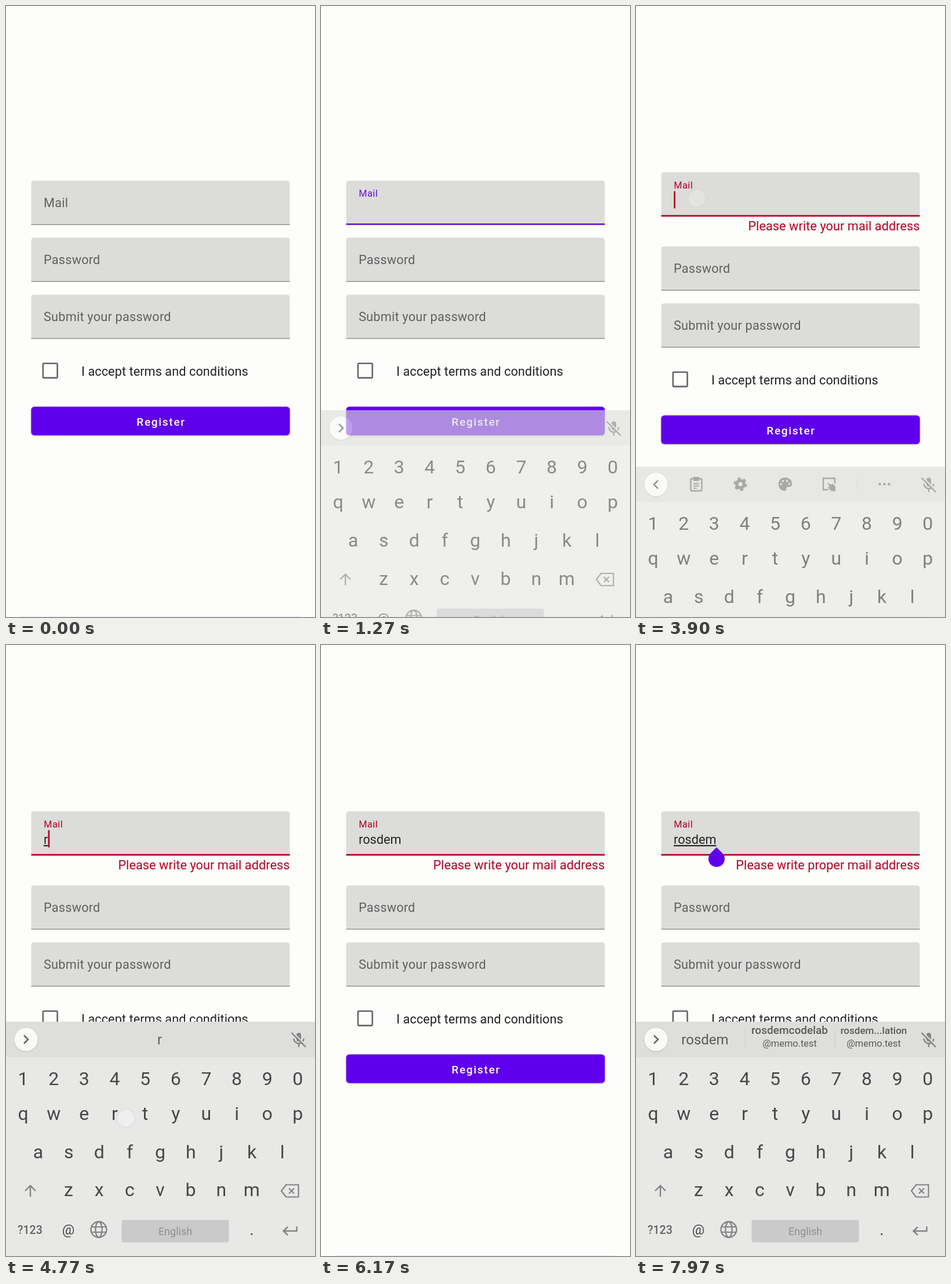
An HTML page for the animation above (8000 ms loop, 533 px wide and 1051 px high).

```html
<!DOCTYPE html>
<html lang="en">
<head>
<meta charset="utf-8">
<title>Register form</title>
<style>
  html, body { margin: 0; height: 100%; overflow: hidden; background: #fdfdfb; }
  svg { display: block; width: 100vw; height: 100vh; font-family: Roboto, sans-serif; }
</style>
</head>
<body>
<svg id="stage" viewBox="0 0 533 1051" preserveAspectRatio="none"></svg>
<script>
const LOOP = 8000;
const NAME = 'rosdem';
const PURPLE = '#5f00ec', ACCENT = '#6614d8', RED = '#b20022';
const PAGE = '#fdfdfb', FIELD = '#dcdcda', BAR = '#dededc', BOARD = '#e8e8e7';
const stage = document.getElementById('stage');

// Timing helpers
const ramp = (t, a, b) => Math.min(1, Math.max(0, (t - a) / (b - a)));
const ease = (t, a, b) => { const k = ramp(t, a, b); return k * k * (3 - 2 * k); };
const lerp = (a, b, k) => a + (b - a) * k;
const within = (t, spans) => spans.some(([a, b]) => t >= a && t < b);
const mix = (a, b, k) => `color-mix(in srgb, ${b} ${k * 100}%, ${a})`;

// Drawing helpers
const text = (x, y, s, size, fill, more = '') =>
  `<text x="${x}" y="${y}" font-size="${size}" fill="${fill}" ${more}>${s}</text>`;
const mid = (x, y, s, size, fill, more = '') =>
  text(x, y, s, size, fill, 'text-anchor="middle" ' + more);
const rect = (x, y, w, h, fill, more = '') =>
  `<rect x="${x}" y="${y}" width="${w}" height="${h}" fill="${fill}" ${more}/>`;
const line = (d, color, w = 2.4) =>
  `<path d="${d}" fill="none" stroke="${color}" stroke-width="${w}"/>`;
const circle = (x, y, r, fill, more = '') =>
  `<circle cx="${x}" cy="${y}" r="${r}" fill="${fill}" ${more}/>`;
const at = (x, y, body, more = '') => `<g transform="translate(${x} ${y})" ${more}>${body}</g>`;

const pen = document.createElement('canvas').getContext('2d');
const textWidth = s => { pen.font = '21.7px Roboto, sans-serif'; return pen.measureText(s).width; };

// Schedule: letters as [time, touch x, touch y], taps as [down, up, x, y]
const typed = [[4740, 207, 814], [4940, 450, 812], [5120, 112, 876],
               [5300, 164, 878], [5480, 138, 812], [5670, 424, 942]];
const taps = [[40, 270, 105, 345], [2390, 2630, 403, 703], [3640, 3840, 105, 331],
              [6200, 6400, 400, 718], [6880, 7050, 112, 338],
              ...typed.map(([t, x, y]) => [t - 100, t + 30, x, y])];
const ripples = [[2530, 403, 703], [6300, 400, 704]];
const cursorOn = [[370, 870], [1370, 1870], [2370, 2870], [3170, 3670],
                  [3760, 4570], [4740, 6170], [6670, 7970]];
const keyboards = [[320, 1160], [3820, 5725], [7150, Infinity]];

// Form
const fieldShape = `<path d="M0 75.5V5.4Q0 0 5.4 0H440.6Q446 0 446 5.4V75.5Z" fill="${FIELD}"/>`;

function plainField(y, label) {
  return at(43.5, y, fieldShape + rect(0, 74.6, 446, 1.4, '#8c8c8c') +
    text(21.5, 45.5, label, 21.7, '#606060', 'letter-spacing=".22"'));
}

function mailField(t, y, value, error, underline) {
  const focus = ease(t, 240, 400);
  const accent = mix(ACCENT, RED, error);
  const thick = lerp(1.4, 2.7, focus);
  let s = fieldShape +
    rect(0, 76.2 - thick, 446, thick, mix('#8c8c8c', accent, focus)) +
    text(lerp(21.5, 21.8, focus), lerp(45.5, 27.6, focus), 'Mail', lerp(21.7, 16.3, focus),
      mix('#606060', accent, focus), `letter-spacing="${lerp(.22, .5, focus)}"`) +
    text(21.5, 56, value, 21.7, '#222', underline ? 'text-decoration="underline"' : '');
  if (within(t, cursorOn))
    s += rect(21.7 + textWidth(value), 32.5, 2.7, 29.5, accent);
  return at(43.5, y, s);
}

function button(t, y) {
  const box = 'x="43.4" y="689.2" width="446.2" height="49.2" rx="5.4"';
  const waves = ripples.map(([start, x, ry]) => {
    const alpha = .24 * ramp(t, start, start + 75) * (1 - ramp(t, start + 230, start + 400));
    return alpha ? circle(x, ry, lerp(60, 400, ease(t, start, start + 260)), '#fff',
      `opacity="${alpha}" clip-path="url(#face)"`) : '';
  }).join('');
  return at(0, y,
    `<clipPath id="face"><rect ${box}/></clipPath>` +
    `<rect ${box} fill="${PURPLE}" style="filter:drop-shadow(0 1.5px 1.5px #0004)"/>` +
    waves + mid(267.5, 721.7, 'Register', 19, '#fff', 'font-weight="500" letter-spacing="1.7"'));
}

function form(t, value, underline) {
  const error = ease(t, 2680, 2960), shift = 15 * error;
  const message = t < 6430 ? 'Please write your mail address' : 'Please write proper mail address';
  return mailField(t, 300.5 - 14.4 * error, value, error, underline) +
    text(489.6, lerp(372, 386, error), message, 21.7, RED,
      `text-anchor="end" letter-spacing=".06" opacity="${error}"`) +
    plainField(398.5 + shift, 'Password') +
    plainField(496.5 + shift, 'Submit your password') +
    at(0, shift,
      rect(63.8, 614.8, 24.8, 24.8, 'none', 'rx="1.5" stroke="#666" stroke-width="2.6"') +
      text(130, 636, 'I accept terms and conditions', 21.7, '#222', 'letter-spacing=".06"')) +
    button(t, shift);
}

// Keyboard
const INK = '#474747', ICON = '#838383', HINT = '#5a5a5a';
const keyRows = [['1234567890', 756.5, 29.5], ['qwertyuiop', 816.5, 29.5],
                 ['asdfghjkl', 882.5, 55.5], ['zxcvbnm', 948, 108]];
const keys = keyRows.map(([row, y, x]) =>
  [...row].map((c, i) => mid(x + 52.65 * i, y, c, 32, INK)).join('')).join('');

const micOff = at(505, 679,
  rect(-4, -12, 8, 15, ICON, 'rx="4"') +
  line('M-8.5-2a8.5 8.5 0 0 0 17 0M0 6.5v6', ICON) +
  line('M-11-13.5L13.5 11', BAR) + line('M-12.5-12L12 12.5', ICON));

const toolIcons =
  at(104, 678,
    rect(-9.5, -9.5, 19, 21, 'none', `rx="2" stroke="${ICON}" stroke-width="2.4"`) +
    rect(-5.5, -12.5, 11, 7, ICON, 'rx="2"') + line('M-5-1h10M-5 3h10M-5 7h6', ICON, 2)) +
  at(180, 678,
    circle(0, 0, 6.3, 'none', `stroke="${ICON}" stroke-width="5.6"`) +
    circle(0, 0, 9.6, 'none', `stroke="${ICON}" stroke-width="4" stroke-dasharray="5 5.05"`)) +
  at(257, 678,
    `<path d="M0-11.5C-15-11.5-15 11.5 0 11.5c4 0 1-4 3-6s9 1 9-6C12-7 7-11.5 0-11.5z" fill="${ICON}"/>` +
    [[-7, 0], [-3.5, -5.5], [3.5, -5.5], [7.3, -.5]].map(([x, y]) => circle(x, y, 1.8, BAR)).join('')) +
  at(333, 678,
    line('M10-1V-10H-10V9.5H-1', ICON) +
    `<path d="M-3-3L3 1l3-2 5 5v8H4L-3 5l4 0z" fill="${ICON}"/>`) +
  rect(380.5, 665, 1, 27, '#cfcfcf') +
  [420.5, 428.5, 436.5].map(x => circle(x, 678, 2.3, ICON)).join('');

const bottomKeys =
  line('M42 949V931M33 939l9-9 9 9', ICON) +
  line('M475 939l8-10.5h21.5v21h-21.5zM488 934.5l9 9M497 934.5l-9 9', ICON, 2.2) +
  text(20, 1012.5, '?123', 19.5, '#626262', 'font-weight="500"') +
  mid(107.5, 1014, '@', 24, INK) +
  at(160, 1005.5,
    circle(0, 0, 13.5, 'none', `stroke="${ICON}" stroke-width="2.3"`) +
    `<ellipse rx="5.7" ry="13.5" fill="none" stroke="${ICON}" stroke-width="2.3"/>` +
    line('M-12.5-4.5h25M-12.5 4.5h25', ICON, 2.2)) +
  rect(199.5, 989, 185, 38.5, '#cacaca', 'rx="4"') +
  mid(292, 1014.5, 'English', 18, '#8f8f8f') +
  mid(424, 1015, '.', 28, INK) +
  line('M501.5 1000v8H479M486 1001l-7.5 7 7.5 7', ICON);

function suggestions(value) {
  if (!value) return '';
  if (value.length < 2) return mid(265, 687, value, 24, HINT);
  const mail = (x, user, size) =>
    mid(x, 668.5, user, size, HINT, 'font-weight="500"') + mid(x, 691, '@memo.test', 16.4, HINT);
  return mid(119, 687, value, 24, HINT) +
    mail(265, 'rosdemcodelab', 19) + mail(410, 'rosdem...lation', 17) +
    rect(188, 662, 1, 32, '#cdcdcd') + rect(343, 662, 1, 32, '#cdcdcd');
}

function keyboard(t, value) {
  const span = keyboards.find(([a, b]) => t >= a && t < b + 245);
  if (!span) return '';
  const show = ramp(t, span[0], span[0] + 220), hide = ramp(t, span[1], span[1] + 245);
  const drop = 511 * ((1 - show) ** 2.75 + hide ** 3);
  const alpha = Math.min(1, 1.85 * show) * (1 - hide ** 1.25);
  const tools = !value && !hide;
  return at(0, drop,
    rect(0, 648, 533, 403, BOARD) + rect(0, 648, 533, 60.5, BAR) +
    circle(34.5, 678.5, 20, '#f9f9f8', 'style="filter:drop-shadow(0 1px 1.5px #0002)"') +
    line(tools ? 'M38 671.5l-7 7 7 7' : 'M31 671.5l7 7-7 7', '#666', 2.6) +
    (tools ? toolIcons : suggestions(value)) + micOff + keys + bottomKeys,
    `opacity="${alpha}"`);
}

// Touch feedback
function touch(t) {
  return taps.map(([down, up, x, y]) => {
    const alpha = .68 * ramp(t, down, down + 60) * (1 - ramp(t, up, up + 110));
    return alpha ? circle(x, y, 14.5, '#f3f3f3',
      `opacity="${alpha}" style="filter:drop-shadow(0 0 2px #aaa8)"`) : '';
  }).join('');
}

function handle(t, value) {
  const x = 65.5 + textWidth(value);
  return t < 7050 ? '' :
    `<path d="M${x} 348l10 10a14 14 0 1 1-20 0z" fill="${PURPLE}"/>`;
}

function draw(t) {
  const value = NAME.slice(0, typed.filter(([time]) => t >= time).length);
  const composing = t < 5725 || t > 7250;
  stage.innerHTML = rect(0, 0, 533, 1051, PAGE) + rect(25, 1050, 483, 1, '#e8e8f4') +
    form(t, value, composing) + handle(t, value) + keyboard(t, value) + touch(t);
}

const start = performance.now();
function tick() {
  draw((performance.now() - start) % LOOP);
  requestAnimationFrame(tick);
}
tick();
</script>
</body>
</html>
```
